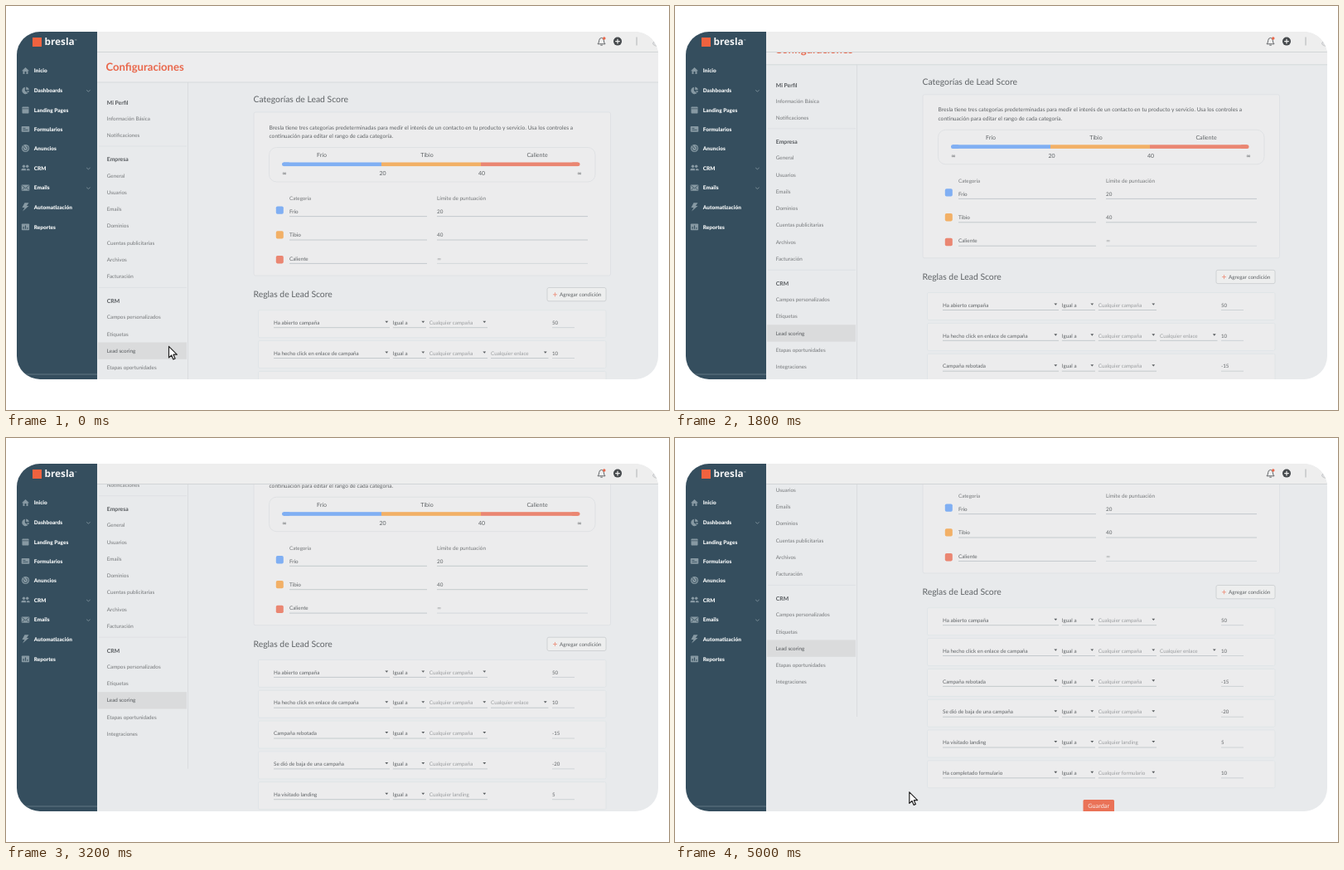
Recreate the animation shown at these times as an HTML page. Size 800 px wide and 487 px high, loop 5.04 s.

```html
<!DOCTYPE html>
<html lang="es">
<head>
<meta charset="utf-8">
<title>Lead Score</title>
<style>
html, body { margin: 0; width: 100%; height: 100%; overflow: hidden; background: #fff; }
svg { display: block; width: 100%; height: 100%; }
text { font-family: Lato, "Open Sans", sans-serif; text-rendering: geometricPrecision; }
.sign { font-family: "DejaVu Sans", sans-serif; }
.brand { font-family: "Open Sans", sans-serif; }
</style>
</head>
<body>
<svg id="stage" viewBox="0 0 800 487" xmlns="http://www.w3.org/2000/svg"></svg>
<script>
const LOOP = 5040, STEP = 40;
const INK = '#5f6366', SOFT = '#75787a', PALE = '#9a9d9f';
const ORANGE = '#e9674b', PANEL = '#ececed', EDGE = '#dcdfe2', RULE = '#b9c1c5';
const NAVY = '#354e5e', ICON = '#8799a3';

// y is the middle of the capitals
const text = (x, y, s, size, fill = INK, weight = 400, anchor = 'start') =>
  `<text x="${x}" y="${(y + size * 0.36).toFixed(2)}" font-size="${size}" fill="${fill}" font-weight="${weight}" text-anchor="${anchor}"${s === '∞' ? ' class="sign"' : ''}>${s}</text>`;
const rect = (x, y, w, h, fill, r = 0, stroke = 'none') =>
  `<rect x="${x}" y="${y}" width="${w}" height="${h}" fill="${fill}" rx="${r}" stroke="${stroke}" stroke-width=".8"/>`;
const path = (d, fill = 'none', stroke = 'none', w = 1) =>
  `<path d="${d}" fill="${fill}" stroke="${stroke}" stroke-width="${w}"/>`;
const hline = (x1, x2, y, stroke = RULE, w = 0.8) => path(`M${x1} ${y}H${x2}`, 'none', stroke, w);
const circle = (x, y, r, fill) => `<circle cx="${x}" cy="${y}" r="${r}" fill="${fill}"/>`;

function icon(kind, y) {
  const at = s => `<g transform="translate(23.5 ${y})">${s}</g>`;
  switch (kind) {
    case 'home': return at(path('M-4.5 .3L0 -4 4.5 .3H3V4H1V1H-1V4H-3V.3Z', ICON));
    case 'pie': return at(path('M-.6 -4V.6L3 3.4A4.3 4.3 0 1 1 -.6 -4Z M.7 -4.3A4.3 4.3 0 0 1 4.3 -.6H.7Z M1 .6H4.4A4 4 0 0 1 3.4 2.8Z', ICON));
    case 'page': return at(rect(-4, -4, 8, 8, ICON, 0.8) + hline(-4, 4, -1.7, NAVY, 0.7));
    case 'form': return at(rect(-4.8, -3.3, 9.6, 6.8, ICON, 0.8) + hline(-3, 0, -0.8, NAVY) + hline(-3, 3, 1.2, NAVY));
    case 'target': return at(circle(0, 0, 4.6, ICON) + path('M-2.8 -1A3 3 0 1 0 1 -2.8M-3 -3.6L.8 .8', 'none', NAVY, 0.9));
    case 'people': return at(circle(-2, -2, 1.7, ICON) + circle(2.2, -2, 1.7, ICON) +
      path('M-5 3V1.7Q-4.6 .5 -2 .5T.7 1.7V3ZM1.6 3V1.3Q1.8 .6 3 .6Q5 .8 5.2 2V3Z', ICON));
    case 'mail': return at(rect(-4.8, -3.6, 9.6, 7.4, ICON, 0.8) + path('M-4.2 -2.6L0 .8 4.2 -2.6M-4 3L-1.2 .2M4 3L1.2 .2', 'none', NAVY, 0.8));
    case 'bolt': return at(path('M-1 -5H4L1.4 -1.4H4L-3.4 5.2 -1 .8H-4Z', ICON));
    default: return at(rect(-4.6, -3.8, 9.2, 7.8, ICON, 0.8) + path('M-2.4 2.4V-.4M0 2.4V-1.8M2.4 2.4V.6', 'none', NAVY, 1.1));
  }
}

function sidebar() {
  const items = [
    ['Inicio', 78, 'home'], ['Dashboards', 101.7, 'pie', 1], ['Landing Pages', 125.5, 'page'],
    ['Formularios', 148.2, 'form'], ['Anuncios', 171.5, 'target'], ['CRM', 195.3, 'people', 1],
    ['Emails', 219, 'mail', 1], ['Automatización', 242.3, 'bolt'], ['Reportes', 266.3, 'chart']
  ];
  return rect(13, 30, 97, 420, NAVY) +
    rect(32, 38, 11, 11, '#f0623f') +
    `<text class="brand" x="46.5" y="47.3" font-size="11.8" font-weight="700" fill="#f4f5f6">bresla</text>` +
    text(82.7, 41.5, '™', 3.6, '#f4f5f6') +
    items.map(([name, y, kind, more]) =>
      icon(kind, y) + text(33.8, y, name, 6.45, '#f1f4f5', 900) +
      (more ? path(`M97.2 ${y - 0.3}l2.2 1.8 2.2 -1.8`, 'none', ICON, 0.8) : '')).join('') +
    hline(13, 110, 444, '#6d808b', 0.8);
}

function topbar() {
  return rect(110, 30, 677, 25, '#eeeeee') + hline(110, 787, 55.5, '#d2d5d7', 1) +
    path('M714 45.8Q715.6 44.4 715.6 41.8Q715.8 38.6 718.5 38.4Q721.3 38.6 721.4 41.8Q721.4 44.4 723 45.8ZM717.3 47.2H719.8', 'none', '#55595c', 0.9) +
    circle(721.8, 39, 1.7, ORANGE) +
    circle(738, 42.6, 5, '#45494c') + path('M735.2 42.6H740.8M738 39.8V45.4', 'none', '#eee', 1.2) +
    path('M761 37.5V47.5', 'none', '#a9acae', 0.9) +
    path('M787 40.5Q780.5 42.5 780.5 45.5Q781.5 48.3 787 48.5', '#dcdddf', '#b9bcbe', 0.7);
}

function submenu() {
  const groups = [
    ['Mi Perfil', 116.5, 135.5, ['Información Básica', 'Notificaciones']],
    ['Empresa', 185, 204.3, ['General', 'Usuarios', 'Emails', 'Dominios', 'Cuentas publicitarias', 'Archivos', 'Facturación']],
    ['CRM', 355.8, 375, ['Campos personalizados', 'Etiquetas', 'Lead scoring', 'Etapas oportunidades', 'Integraciones']]
  ];
  return path('M219.5 92V498', 'none', '#d8dbde', 0.9) +
    rect(111, 405.5, 107, 20.3, '#dadbdc') +
    hline(112, 218, 169, EDGE) + hline(112, 218, 339.4, EDGE) +
    groups.map(([head, y, first, items]) => text(121.8, y, head, 6.8, '#55595c', 700) +
      items.map((s, i) => text(121.8, first + i * 20.25, s, 6.3, s === 'Lead scoring' ? '#55595c' : SOFT)).join('')).join('');
}

function categories() {
  const cats = [
    ['Frío', '20', '#80aff3', 381], ['Tibio', '40', '#f2b066', 508], ['Caliente', '∞', '#ea8672', 641]
  ];
  const [blue, amber, red] = cats.map(c => c[2]);
  const marks = [['∞', 336], ['20', 454.5], ['40', 574], ['∞', 692]];
  return text(298.5, 112.6, 'Categorías de Lead Score', 10.4) +
    rect(299, 128, 430.5, 197, PANEL, 2, EDGE) +
    text(317.5, 146.3, 'Bresla tiene tres categorías predeterminadas para medir el interés de un contacto en tu producto y servicio. Usa los controles a', 6.65) +
    text(317.5, 156.8, 'continuación para editar el rango de cada categoría.', 6.65) +
    rect(317.5, 170.5, 393.5, 41.5, 'none', 9, '#dcdfe1') +
    rect(333, 188.5, 10, 4.6, blue, 2) + rect(682, 188.5, 10.5, 4.6, red, 2) +
    rect(335, 188.5, 118, 4.6, blue) + rect(453, 188.5, 120, 4.6, amber) + rect(573, 188.5, 117, 4.6, red) +
    marks.map(([s, x]) => text(x, 201.3, s, 7, INK, 400, 'middle')).join('') +
    text(342, 231.7, 'Categoría', 6.2, SOFT) + text(520, 231.7, 'Límite de puntuación', 6.4, SOFT) +
    cats.map(([name, limit, color, x], i) => {
      const y = 247.6 + i * 28.4, open = limit === '∞';
      return text(x, 179.5, name, 7, INK, 400, 'middle') +
        rect(325.8, 241.4 + i * 29.8, 9, 9.4, color, 1.8) +
        text(342, y, name, 6.3) + text(520, y, limit, 6.3, open ? PALE : INK) +
        hline(342, 508, y + 6) + hline(520, 702, y + 6, open ? '#cfd4d7' : RULE);
    }).join('');
}

function rules() {
  const rows = [
    ['Ha abierto campaña', 'campaña', '50'], ['Ha hecho click en enlace de campaña', 'campaña', '10', 'enlace'],
    ['Campaña rebotada', 'campaña', '-15'], ['Se dió de baja de una campaña', 'campaña', '-20'],
    ['Ha visitado landing', 'landing', '5'], ['Ha completado formulario', 'formulario', '10']
  ];
  const select = (x, end, y, s, fill) => text(x, y, s, 6.3, fill) + hline(x, end, y + 6) +
    path(`M${end - 5.6} ${y - 2}h3.8l-1.9 2.3Z`, '#5a5e61');
  return text(298.5, 347.5, 'Reglas de Lead Score', 10.4) +
    rect(653, 339.5, 71, 16.3, '#edeeee', 2, '#c8ccce') +
    path('M660 347.8H665M662.5 345.3V350.3', 'none', '#ec8c77', 0.8) + text(668, 347.8, 'Agregar condición', 6.36) +
    rows.map(([name, kind, score, extra], i) => {
      const y = 381.7 + i * 36.83;
      return rect(304.5, y - 15, 419.5, 33, PANEL, 1.5, '#dee4e6') +
        select(323, 463, y, name, INK) + select(466.8, 507, y, 'Igual a', INK) +
        select(510.8, 581, y, 'Cualquier ' + kind, PALE) +
        (extra ? select(585, 654.5, y, 'Cualquier ' + extra, PALE) : '') +
        text(659, y, score, 6.1) + hline(659, 686, y + 6, '#c6ccd0');
    }).join('') +
    rect(492.5, 598, 37.5, 16, '#ea7257', 1.5) + text(511.2, 605.2, 'Guardar', 7.3, '#f8eeeb', 400, 'middle');
}

const stage = document.getElementById('stage');
stage.innerHTML =
  `<defs>
    <clipPath id="frame"><rect x="13" y="31" width="774" height="419" rx="28"/></clipPath>
    <clipPath id="view"><rect x="110" y="55" width="677" height="395"/></clipPath>
  </defs>
  <g clip-path="url(#frame)">
    ${rect(110, 30, 677, 420, '#e8eaec')}
    <g clip-path="url(#view)"><g id="page">
      ${rect(110, 50, 677, 42, '#ededee')}
      ${text(120.5, 73.6, 'Configuraciones', 13.1, ORANGE, 700)}
      ${submenu()}${hline(110, 787, 92, '#d3d7da', 0.9)}${categories()}${rules()}
    </g></g>
    ${topbar()}${sidebar()}
    <g id="cursor"><path d="M0 0V13.6L3.2 10.7 5.4 15.6 7.6 14.6 5.5 9.9H9.8Z" fill="#fff" stroke="#222" stroke-width="1.2" stroke-linejoin="round"/></g>
  </g>`;
const page = document.getElementById('page');
const cursor = document.getElementById('cursor');

// Keys are [time, ...values]
const scrollKeys = [[1080, 0], [1400, 8.6], [1500, 8.6], [1800, 21.2], [1860, 21.2], [2600, 54.6], [3200, 99.3], [3880, 162]];
const cursorKeys = [
  [280, 196.5, 410.3], [400, 235, 385], [640, 520, 195], [800, 680, 90], [960, 800, 62],
  [4240, 800, 182], [4480, 660, 300], [4640, 470, 400], [4760, 325, 429], [5000, 282.8, 426.8]
];

function sample(keys, t) {
  const next = keys.findIndex(k => k[0] > t);
  if (next === 0) return keys[0].slice(1);
  if (next < 0) return keys[keys.length - 1].slice(1);
  const a = keys[next - 1], b = keys[next];
  const u = (t - a[0]) / (b[0] - a[0]);
  return a.slice(1).map((v, i) => v + (b[i + 1] - v) * u);
}

function draw() {
  const t = Math.floor(performance.now() % LOOP / STEP) * STEP;
  const [scroll] = sample(scrollKeys, t);
  const [x, y] = sample(cursorKeys, t);
  page.setAttribute('transform', `translate(0 ${-scroll})`);
  cursor.setAttribute('transform', `translate(${x} ${y})`);
  requestAnimationFrame(draw);
}
draw();
</script>
</body>
</html>
```
